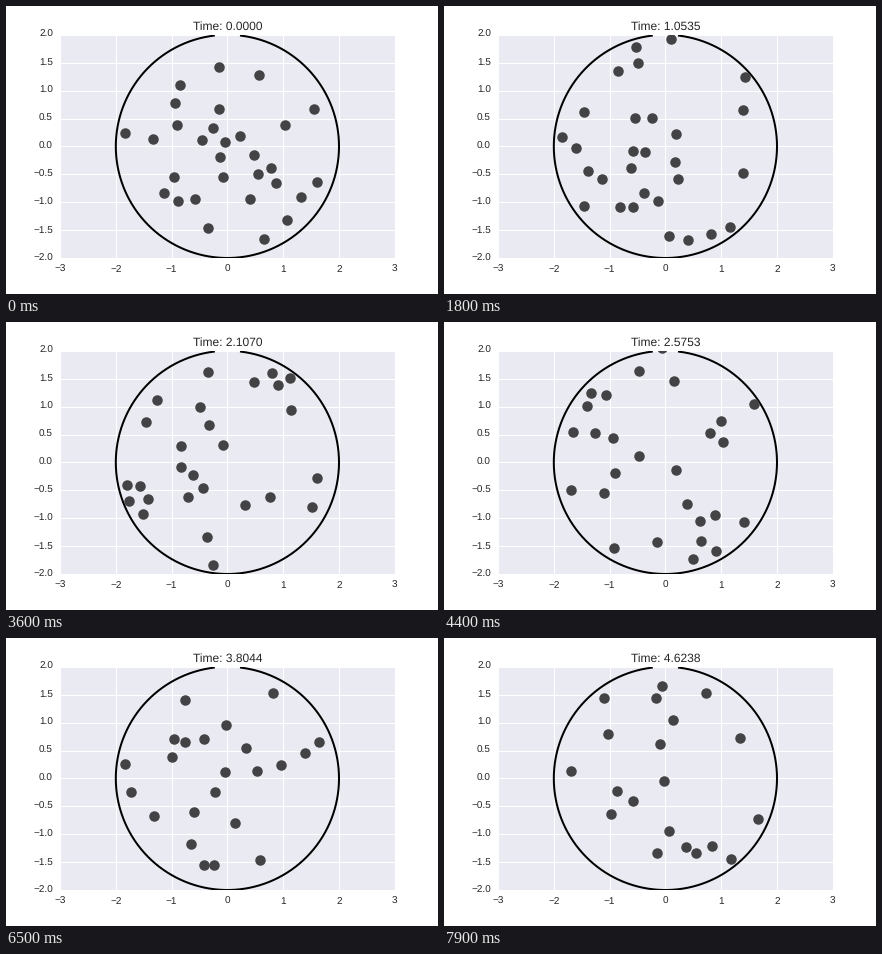
A matplotlib script for the animation above (8 s loop, 432 px wide and 288 px high).

```python
import matplotlib.pyplot as plt
import numpy as np
from matplotlib.animation import FuncAnimation

FRAMES, INTERVAL = 80, 100
STEP = 0.058529          # gas time per frame
SUBSTEPS = 12
WALL, BALL = 2.0, 0.1    # radii
GAP = 0.122              # half opening at the top, radians
SPEED = 2.8              # spread of each velocity component

plt.rcParams.update({
    "font.family": "Liberation Sans",
    "font.size": 10,
    "text.color": ".15",
    "text.hinting": "none",
    "xtick.color": ".15",
    "ytick.color": ".15",
})

# Starting ball centres in stage pixels
START = [
    (213, 61), (253, 69), (174, 79), (169, 97), (213, 103), (308, 103),
    (171, 119), (279, 119), (119, 127), (147, 133), (207, 122), (196, 134),
    (219, 136), (234, 130), (214, 151), (248, 149), (265, 162), (252, 168),
    (270, 177), (311, 176), (217, 171), (168, 171), (158, 187), (172, 195),
    (189, 193), (244, 193), (295, 191), (281, 214), (202, 222), (258, 233),
]


def bounce_wall(pos, vel):
    """Reflect discs at the wall, letting them out through the gap."""
    r = np.hypot(*pos.T)
    normal = pos / r[:, None]
    out = np.sum(vel * normal, axis=1)
    in_gap = abs(np.arctan2(pos[:, 0], pos[:, 1])) < GAP
    hit = (r > WALL - BALL) & (r < WALL) & (out > 0) & ~in_gap
    vel[hit] -= 2 * out[hit, None] * normal[hit]


def bounce_pairs(pos, vel):
    """Elastic collisions between equal discs."""
    a, b = np.triu_indices(len(pos), 1)
    gap = pos[a] - pos[b]
    dist = np.hypot(*gap.T)
    for k in np.flatnonzero(dist < 2 * BALL):
        i, j, normal = a[k], b[k], gap[k] / dist[k]
        closing = (vel[i] - vel[j]) @ normal
        if closing < 0:
            vel[i] -= closing * normal
            vel[j] += closing * normal


def run_gas():
    """Positions of all discs at every frame."""
    rng = np.random.default_rng(4)
    pos = (np.array(START) - (221.4, 140.4)) / (55.8, -55.8)
    vel = rng.normal(0, SPEED, pos.shape)
    track = [pos.copy()]
    while len(track) < FRAMES:
        for _ in range(SUBSTEPS):
            pos += vel * STEP / SUBSTEPS
            bounce_wall(pos, vel)
            bounce_pairs(pos, vel)
        track.append(pos.copy())
    return track


track = run_gas()

fig = plt.figure(figsize=(6, 4), dpi=72, facecolor="white")
ax = fig.add_axes([0.125, 0.125, 0.775, 0.775], facecolor="#EAEAF2")
ax.set(xlim=(-3, 3), ylim=(-2, 2), xticks=range(-3, 4),
       yticks=np.arange(-2, 2.1, 0.5))
ax.set_axisbelow(True)
ax.grid(color="white", lw=1, ls="-")
ax.tick_params(length=0, pad=7, labelsize=10)
plt.setp(ax.get_yticklabels(), va="center")
ax.spines[:].set_visible(False)

angle = np.linspace(np.pi / 2 + GAP, 2.5 * np.pi - GAP, 400)
ax.plot(WALL * np.cos(angle), WALL * np.sin(angle), color="black", lw=2)
balls, = ax.plot([], [], "o", ms=10.5, mew=0, color="#434345")
title = ax.set_title("", fontsize=12, pad=5)


def draw(frame):
    balls.set_data(*track[frame].T)
    title.set_text(f"Time: {frame * STEP:.4f}")
    return balls, title


anim = FuncAnimation(fig, draw, frames=FRAMES, interval=INTERVAL,
                     repeat=True, repeat_delay=0, blit=False)
plt.show()
```
